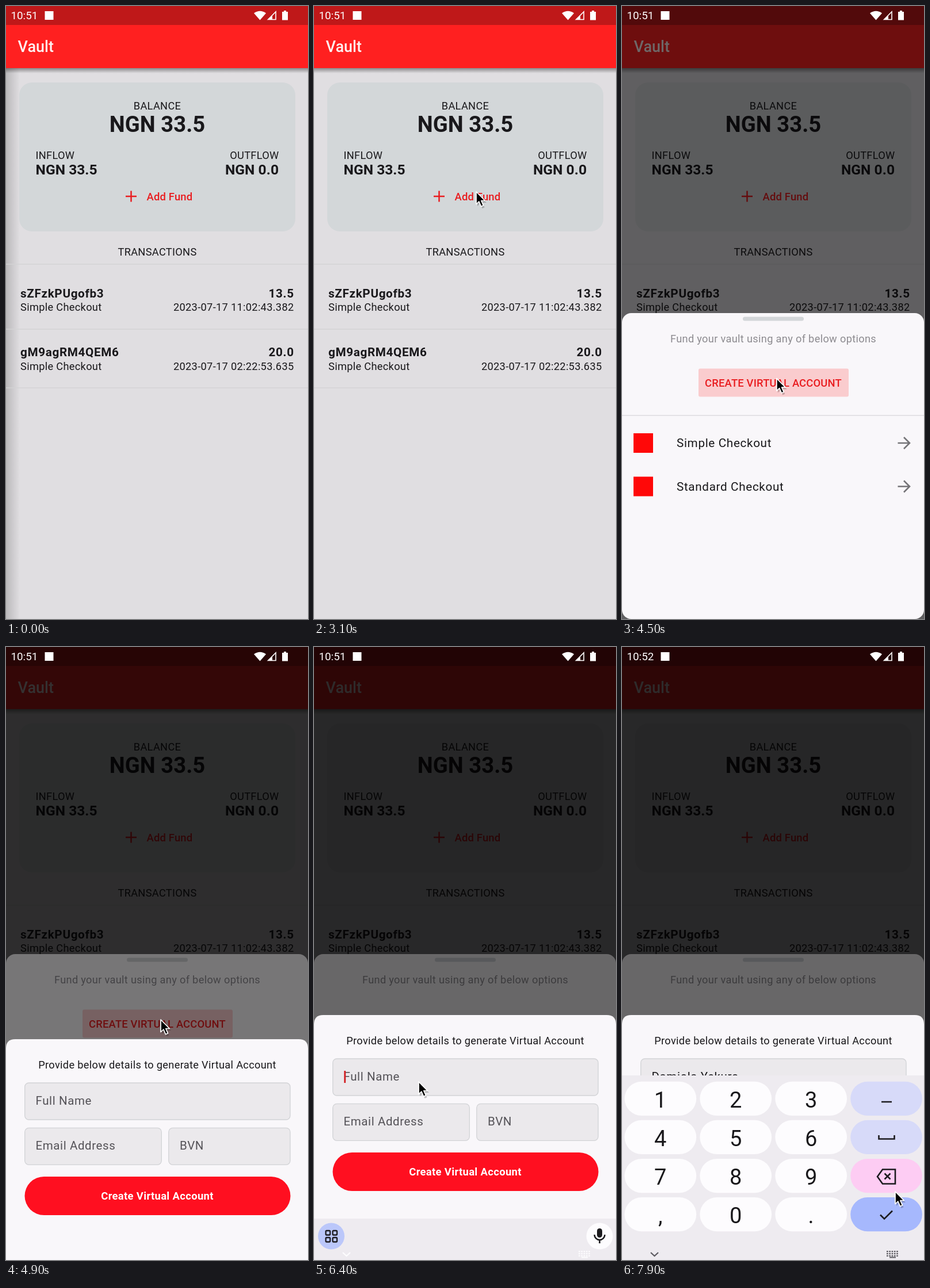
Animation of 525 by 1066 pixels, one loop 8 s. Source, as an HTML page:

```html
<!DOCTYPE html>
<html lang="en">
<head>
<meta charset="utf-8">
<title>Vault</title>
<style>
html, body { margin: 0; width: 100%; height: 100%; overflow: hidden; background: #e0dee1; }
svg { display: block; width: 100%; height: 100%; }
text { font-family: Roboto, sans-serif; font-size: 18.2px; letter-spacing: .33px; fill: #19181b; white-space: pre; }
.title { font-size: 27px; font-weight: 500; letter-spacing: 0; fill: #fff0f0; }
.big { font-size: 38.2px; font-weight: 700; letter-spacing: 0; }
.sum { font-size: 24.6px; font-weight: 700; letter-spacing: 0; }
.item { font-size: 20.7px; font-weight: 700; letter-spacing: .65px; }
.row { font-size: 20.7px; letter-spacing: .65px; }
.hint { font-size: 20.5px; letter-spacing: .6px; fill: #545257; }
.name { font-size: 20.5px; letter-spacing: .6px; }
.link { font-size: 18.4px; font-weight: 500; letter-spacing: .18px; fill: #e91d20; }
.muted { fill: #8d8b90; }
.cta { font-size: 18.4px; font-weight: 700; letter-spacing: .35px; fill: #fff; }
.clock { font-size: 18.8px; letter-spacing: 0; fill: #fff; }
.key { font-size: 38px; letter-spacing: 0; }
.line { fill: none; stroke: #1c1b1f; stroke-width: 2.6; }
</style>
</head>
<body>
<svg id="stage" viewBox="0 0 525 1066" xmlns="http://www.w3.org/2000/svg"></svg>
<script>
const LOOP = 8000, STEP = 100;
const NAME = 'Damiola Yekuro';
const T = { edge: 2000, sheet: 3200, press: 4400, form: 4900, dim: 5000, focus: 6400, type: 6500, pad: 7000, minute: 7300 };

const text = (x, y, s, cls = '', anchor = 'start') =>
  `<text x="${x}" y="${y}" class="${cls}" text-anchor="${anchor}">${s}</text>`;
const rect = (x, y, w, h, fill, r = 0, extra = '') =>
  `<rect x="${x}" y="${y}" width="${w}" height="${h}" rx="${r}" fill="${fill}" ${extra}/>`;
const path = (d, extra = 'class="line"') => `<path d="${d}" ${extra}/>`;
const group = (id, body) => `<g id="${id}">${body}</g>`;
const rule = (y, color) => rect(0, y - .7, 525, 1.4, color);

const entry = (y, id, sum, date) =>
  text(25, y, id, 'item') + text(500.8, y, sum, 'item', 'end') +
  text(25, y + 23.3, 'Simple Checkout') + text(500.5, y + 23.3, date, '', 'end');

const home = () =>
  rect(0, 0, 525, 1066, '#e0dee1') +
  rect(0, 108, 24, 958, 'url(#edge)', 0, 'id="side"') +
  rect(0, 108, 525, 9, 'url(#drop)') +
  rect(0, 0, 525, 33, '#bf1819') + rect(0, 33, 525, 75, '#ff2020') +
  text(20.5, 80.3, 'Vault', 'title') +
  rect(23, 133, 480, 259, '#d3d7d9', 22) +
  text(263, 179.5, 'BALANCE', '', 'middle') +
  text(263, 219.3, 'NGN 33.5', 'big', 'middle') +
  text(51.5, 265.7, 'INFLOW') + text(51.5, 293, 'NGN 33.5', 'sum') +
  text(474.6, 265.7, 'OUTFLOW', '', 'end') + text(474, 293, 'NGN 0.0', 'sum', 'end') +
  path('M208 331h19M217.5 321.5v19', 'stroke="#e91d20" stroke-width="2.5"') +
  text(244.5, 337.5, 'Add Fund', 'link') +
  text(263, 434.3, 'TRANSACTIONS', '', 'middle') +
  rule(449, '#d3d3d5') + rule(562, '#d3d3d5') + rule(664, '#d3d3d5') +
  entry(507, 'sZFzkPUgofb3', '13.5', '2023-07-17 11:02:43.382') +
  entry(609.4, 'gM9agRM4QEM6', '20.0', '2023-07-17 02:22:53.635');

const option = (y, label) =>
  rect(20, y - 17, 34, 34, '#ff0808') + text(95, y + 7, label, 'row') +
  path(`M479.5 ${y}h20M490 ${y - 10}l10 10l-10 10`, 'fill="none" stroke="#757478" stroke-width="2.6"');

const sheet = () =>
  rect(0, 534, 525, 532, '#f9f7fa', 16) +
  rect(210, 540.5, 106, 7, '#d3d6d9', 3.5) +
  text(263, 585, 'Fund your vault using any of below options', 'muted', 'middle') +
  rect(133, 630.5, 261, 49, '#ff2020', 3, 'id="press" opacity=".2"') +
  text(263, 661.5, 'CREATE VIRTUAL ACCOUNT', 'link', 'middle') +
  rule(712, '#dcdade') + option(760, 'Simple Checkout') + option(835.5, 'Standard Checkout');

const field = (x, y, w) => rect(x, y, w, 64, '#ebe9ec', 7, 'stroke="#d2d3d6" stroke-width="1.3"');

const form = () =>
  path('M0 1120V698Q0 682 16 682H509Q525 682 525 698V1120Z', 'fill="#f9f7fa"') +
  text(263, 733, 'Provide below details to generate Virtual Account', '', 'middle') +
  field(32.7, 758, 461.3) + field(32.7, 836.3, 237.6) + field(282.8, 836.3, 211.2) +
  text(51.5, 796, 'Full Name', 'hint', 'start') +
  text(51.5, 874, 'Email Address', 'hint') + text(302, 874, 'BVN', 'hint') +
  rect(32.5, 921, 462, 67, '#ff0f20', 33.5) +
  text(263, 961.3, 'Create Virtual Account', 'cta', 'middle');

const tools = () =>
  rect(0, 994, 525, 72, '#eeebf0') +
  '<circle cx="30" cy="1024.5" r="23" fill="#bbc7fa"/><circle cx="496.5" cy="1024.5" r="23" fill="#fdfcfe"/>' +
  [20.5, 32.5].map(x => [1015, 1027].map(y =>
    rect(x, y, 7.5, 7.5, 'none', 1.5, 'stroke="#1c1b1f" stroke-width="2.3"')).join('')).join('') +
  rect(492, 1011, 9, 16, '#1c1b1f', 4.5) +
  path('M487.5 1022a9 9 0 0 0 18 0M496.5 1031v6');

const pad = () => {
  const keys = ['1', '2', '3', '', '4', '5', '6', '', '7', '8', '9', '', ',', '0', '.', ''];
  const tint = ['#d7daf9', '#d7daf9', '#fdccf3', '#a6b8fd'];
  return rect(0, 745, 525, 321, '#eeebf0') + keys.map((k, i) => {
    const c = i % 4, r = i >> 2, x = 4.5 + c * 130.9, y = 755.7 + r * 67.1;
    return rect(x, y, 124.7, 59.3, c < 3 ? '#fdfcfe' : tint[r], 29.6) +
      text(x + 62.3, y + 45.3, k, 'key', 'middle');
  }).join('') +
  path('M451 791h18M446.500 849v6.500h27v-6.500M449 987.500l7 7l14-14') +
  path('M453 908.500h22v25h-22l-9-12.500ZM456.500 915.500l10 10m0-10l-10 10');
};

const footer = () => {
  let dots = '';
  for (let i = 0; i < 15; i++) dots += rect(460 + i % 5 * 4.3, 1050 + Math.floor(i / 5) * 3.8, 2.6, 2.3, 'currentColor');
  return path('M50 1053l6.500 6l6.500-6', 'fill="none" stroke="currentColor" stroke-width="2.2"') + dots +
    rect(465, 1060.5, 11, 2, 'currentColor');
};

const status = () =>
  text(8.5, 23.4, '10:51', 'clock') + rect(67.5, 9, 15, 15, '#fff') +
  path('M431 12.500Q441.500 5 452 12.500L441.500 24.500Z', 'fill="#fff"') +
  path('M455.500 23.500L469 10V23.500Z', 'fill="none" stroke="#fff" stroke-width="1.6"') +
  path('M455 24L463 16V24Z', 'fill="#fff"') +
  path('M480 10h3v-2h4v2h3v14.500h-10Z', 'fill="#fff"');

const stage = document.getElementById('stage');
stage.innerHTML =
  '<defs><linearGradient id="edge"><stop stop-color="#000" stop-opacity=".17"/><stop offset="1" stop-color="#000" stop-opacity="0"/></linearGradient>' +
  '<linearGradient id="drop" x2="0" y2="1"><stop stop-color="#000" stop-opacity=".38"/><stop offset="1" stop-color="#000" stop-opacity="0"/></linearGradient></defs>' +
  home() + rect(0, 0, 525, 1066, '#000', 0, 'id="scrim1" opacity=".57"') +
  group('sheet', sheet()) + rect(0, 0, 525, 1066, '#000', 0, 'id="scrim2"') +
  group('form', form() + rect(52.3, 779, 2.8, 21, '#d32024', 0, 'id="caret"')) +
  group('tools', tools()) + group('pad', pad()) + group('footer', footer()) + status() +
  group('cursor',
    path('M1 2V23L6 18.500L9.500 27L13.500 25.300L10 17H17Z', 'fill="#000" opacity=".22" transform="translate(1 2)"') +
    path('M0 0V21.500L4.800 17L8.500 25.500L12.500 23.800L8.800 15.500H15.300Z', 'fill="#000" stroke="#fff" stroke-width="1.7" stroke-linejoin="round"'));

const $ = id => document.getElementById(id);
const show = (id, on) => { $(id).style.display = on ? '' : 'none'; };
const clock = stage.querySelector('.clock');
const nameText = [...stage.querySelectorAll('.hint')].find(e => e.textContent === 'Full Name');

// time, x, y of the pointer tip
const PATH = [
  [800, 522, 560], [1400, 290, 328], [1700, 289, 327], [3000, 282, 323], [3500, 282, 323],
  [4200, 268, 645], [4600, 269, 648], [5300, 269, 648], [6000, 184, 768], [6300, 182, 756],
  [6500, 182, 756], [6900, 350, 820], [7100, 350, 820], [7800, 475, 947], [8000, 475, 947]
];

function pointer(t) {
  const i = Math.max(1, PATH.findIndex(p => p[0] > t));
  const [t0, x0, y0] = PATH[i - 1], [t1, x1, y1] = PATH[i];
  const u = Math.min(1, Math.max(0, (t - t0) / (t1 - t0))), e = u * u * (3 - 2 * u);
  return [x0 + (x1 - x0) * e, y0 + (y1 - y0) * e];
}

function draw(ms) {
  const t = Math.floor(ms % LOOP / STEP) * STEP;
  const focused = t >= T.focus, typed = t >= T.type;
  show('side', t < T.edge);
  show('scrim1', t >= T.sheet);
  show('sheet', t >= T.sheet);
  show('press', t >= T.press && t < 5400);
  show('scrim2', t >= T.form);
  $('scrim2').setAttribute('opacity', t < T.dim ? .52 : .58);
  show('form', t >= T.form);
  $('form').setAttribute('transform', `translate(0 ${focused ? -42 : 0})`);

  const count = Math.min(NAME.length, Math.ceil((t - T.type + STEP) / 400 * NAME.length));
  nameText.textContent = typed ? NAME.slice(0, count) : 'Full Name';
  nameText.setAttribute('class', typed ? 'name' : 'hint');
  show('caret', focused && t < T.pad);
  $('caret').setAttribute('x', typed ? 53 + nameText.getComputedTextLength() : 52.3);

  show('tools', focused && t < T.pad);
  show('pad', t >= T.pad);
  show('footer', focused);
  $('footer').style.color = typed ? '#5c5a60' : '#fdfcfe';
  clock.textContent = t < T.minute ? '10:51' : '10:52';

  show('cursor', t >= PATH[0][0]);
  $('cursor').setAttribute('transform', `translate(${pointer(t)})`);
}

const start = performance.now();
(function tick() {
  draw(performance.now() - start);
  requestAnimationFrame(tick);
})();
</script>
</body>
</html>
```
